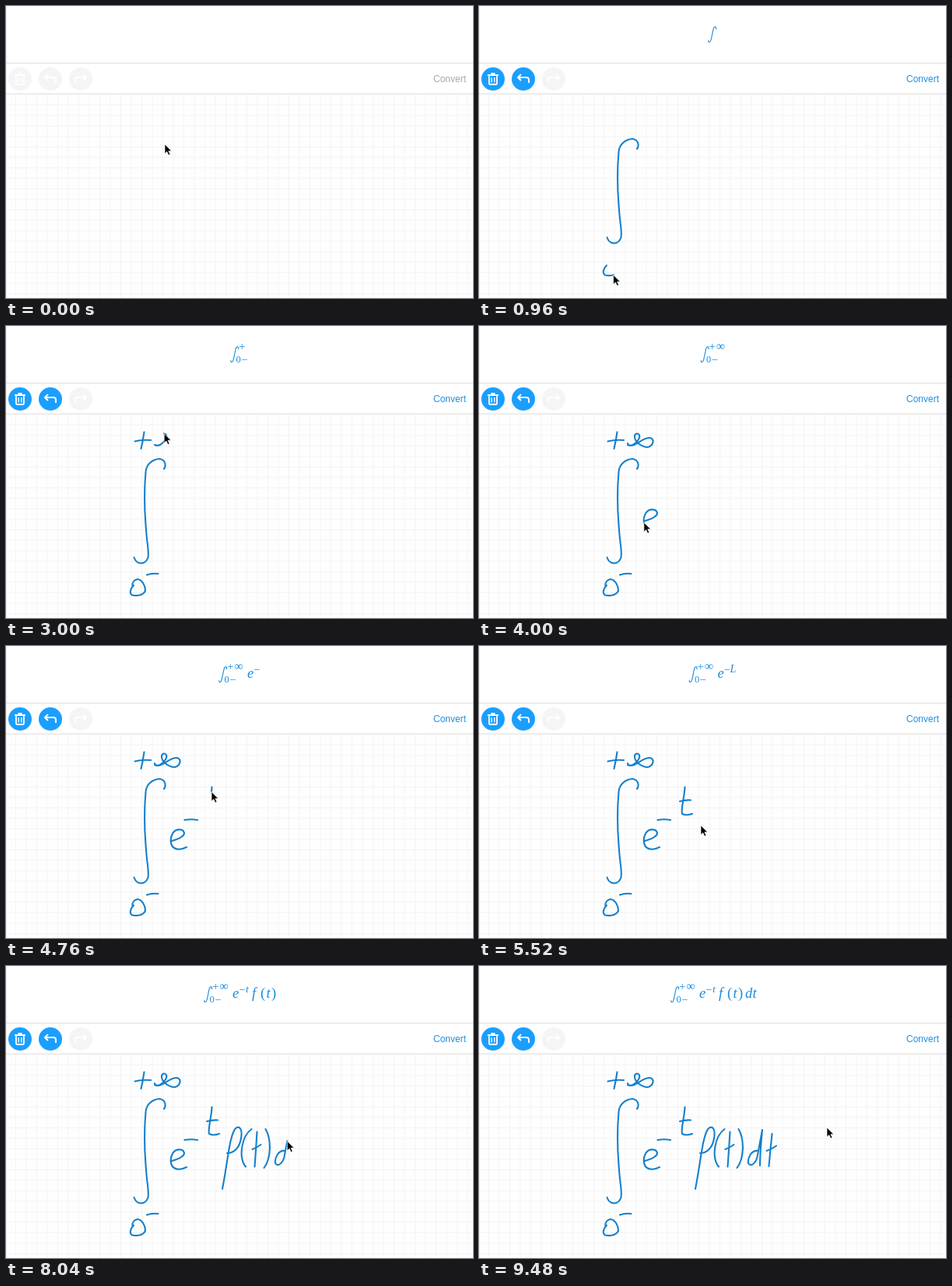
Animation of 600x376 px, one loop 9520 ms. Source, as an HTML page:

```html
<!DOCTYPE html>
<html lang="en">
<head>
<meta charset="utf-8">
<title>Handwritten math</title>
<style>
  html, body { margin: 0; width: 100%; height: 100%; overflow: hidden; background: #fff; }
  svg { display: block; width: 600px; height: 376px; }
  .convert { font: 12px "Liberation Sans", Arial, sans-serif; }
  #formula { fill: #1a8cdc; font-family: "Liberation Serif", "Times New Roman", serif; }
  #formula .it { font-style: italic; }
  #ink path { fill: none; stroke: #1580cd; stroke-width: 2.1; stroke-linecap: round; stroke-linejoin: round; }
  .icon { fill: none; stroke: #fff; stroke-width: 2; stroke-linejoin: round; }
</style>
</head>
<body>
<svg viewBox="0 0 600 376">
  <defs>
    <pattern id="grid" x="12" y="113.5" width="13.5" height="13.5" patternUnits="userSpaceOnUse">
      <path d="M.5 0V13.5M0 .5H13.5" stroke="#f4f4f4" fill="none"/>
    </pattern>
    <g id="trash" class="icon">
      <path d="M-5-4.5V5.5Q-5 7-3.5 7H3.5Q5 7 5 5.5V-4.5" stroke-width="1.8"/>
      <path d="M-7-5H7M-2.5-7H2.5" stroke-width="1.8"/>
      <path d="M-1.8-2V4.5M1.8-2V4.5" stroke-width="1.4"/>
    </g>
    <g id="arrow" class="icon">
      <path d="M-3-6L-7-2L-3 2M-7-2H4Q7-2 7 1V5"/>
    </g>
  </defs>

  <rect width="600" height="376" fill="#fff"/>
  <rect y="114" width="600" height="262" fill="#fefefe"/>
  <rect y="114" width="600" height="262" fill="url(#grid)"/>
  <path d="M.5 0V376" stroke="#ececec"/>
  <path d="M0 73.5H600M0 113H600" stroke="#dcdcdc"/>

  <g fill="#f5f4f6">
    <circle cx="18" cy="94" r="15"/>
    <circle cx="57" cy="94" r="15"/>
    <circle cx="96" cy="94" r="15"/>
  </g>
  <g id="active" fill="#1a9fff">
    <circle cx="18" cy="94" r="15"/>
    <circle cx="57" cy="94" r="15"/>
    <text class="convert" x="549" y="97.5" fill="#1a8fe0">Convert</text>
  </g>
  <text id="idle" class="convert" x="549" y="97.5" fill="#a8a8a8">Convert</text>
  <use href="#trash" x="18" y="94"/>
  <use href="#arrow" x="57" y="94"/>
  <use href="#arrow" transform="translate(96 94) scale(-1 1)"/>

  <g id="formula"></g>
  <g id="ink"></g>
  <path id="cursor" d="M0 0V12.2L2.8 9.6L4.8 14L6.9 13.1L4.9 8.8H8.8Z" fill="#000" stroke="#fff" stroke-width=".7"/>
</svg>

<script>
const LOOP = 9520;
const byId = id => document.getElementById(id);
const make = (parent, tag, attrs) => {
  const el = document.createElementNS('http://www.w3.org/2000/svg', tag);
  for (const key in attrs) el.setAttribute(key, attrs[key]);
  return parent.appendChild(el);
};
const clamp = v => Math.max(0, Math.min(1, v));
const smooth = v => v * v * (3 - 2 * v);

// Pen strokes: start ms, end ms, path
const strokes = [
  [30, 600, 'M203 184C206 180 205 172 197 171C187 172 180 179 179.5 188C177 215 178 240 180 262C181 280 184 290 182.5 298C179 308 168 308 164.5 298'],
  [780, 1250, 'M164 334C160 338 158 344 162 346.5C168 348 176 347 179 341C179 334 175 327 169 326C164 327 162 331 162.5 335'],
  [1500, 1640, 'M181 320.5Q187 318 195.5 319'],
  [2040, 2240, 'M165.500 148.500Q175 146 186 147'],
  [2400, 2590, 'M177.500 136.500Q176 148 173.500 158'],
  [2850, 3450, 'M191 153C196 156 202 151 205 146C209 139 202 136 200 141C199 149 209 156 217 156C224 154 226 146 220 144C211 143 204 153 196 154Q191 154 191 151'],
  [3720, 4140, 'M213 251C220 249 229 246 229 241C228 235 219 235 215 240C210 247 211 257 216 260C221 263 228 261 232 259'],
  [4380, 4530, 'M229.500 224Q238 222.500 246 224'],
  [4720, 5040, 'M264.500 181.500C264 195 259 211 261 216Q266 219 274 216'],
  [5210, 5340, 'M258 200Q265 198 272 198.500'],
  [5600, 6150, 'M284 241C293 241 300 234 302 222C304 210 300 205 295 209C287 218 285 252 278 287'],
  [6360, 6620, 'M315.500 210C303 219 298 246 308 258.500'],
  [6810, 7000, 'M322.500 213.500Q321 238 319.500 258.500'],
  [7110, 7230, 'M316.500 236Q322 234 327.500 230'],
  [7400, 7620, 'M333.500 210C341 223 341 247 331.500 260'],
  [7760, 8320, 'M358 238C350 237 345 247 346 254C350 260 357 252 358 243L364 211Q361 240 361 257'],
  [8500, 8700, 'M376.500 216Q374 240 372.500 258'],
  [8850, 8960, 'M369.500 238Q376 236 382 231.500'],
].map(([start, end, d]) => {
  const el = make(byId('ink'), 'path', { d });
  return { start, end, el, length: el.getTotalLength() };
});

// Resting points of the pointer between strokes: ms, x, y
const rests = [[0, 204, 178], [2000, 169, 146], [5520, 285, 231], [6760, 322, 225], [9480, 447, 208]];
const stops = rests.map(([t, x, y]) => ({ t, x, y }));
for (const s of strokes) {
  const a = s.el.getPointAtLength(0), b = s.el.getPointAtLength(s.length);
  stops.push({ t: s.start, x: a.x, y: a.y }, { t: s.end, x: b.x, y: b.y });
}
stops.sort((a, b) => a.t - b.t);

// Typeset glyphs: shown from ms, x, baseline, size, text, style, hidden at ms
const sign = '\u2212';
const glyphs = [
  [1420, 7.5, 47, 12.5, '0'],
  [1840, 14, 47.5, 15, sign],
  [2700, 11, 31, 15, '+'],
  [3620, 20.5, 31, 15.5, '\u221e'],
  [4450, 37, 41, 18.5, 'e', 'it'],
  [4740, 45, 35, 14.5, sign],
  [5200, 53, 34, 14, 'L', 'it', 5640],
  [5640, 54, 34, 13.5, 't', 'it'],
  [6420, 62, 41, 18.5, 'f', 'it'],
  [6960, 73, 41, 18.5, '('],
  [7360, 80.5, 41, 18.5, 't', 'it'],
  [7780, 87, 41, 18.5, ')'],
  [8540, 96, 41, 18.5, 'd', 'it'],
  [9120, 105.5, 41, 18.5, 't', 'it'],
].map(([from, x, y, size, text, style = '', until = LOOP]) => {
  const el = make(byId('formula'), 'text', { x, y, 'font-size': size, class: style });
  el.textContent = text;
  return { from, until, el };
});
glyphs.push({
  from: 700, until: LOOP,
  el: make(byId('formula'), 'path', {
    d: 'M10.500 29.500C11 26 8 25.500 7 30L4.500 42C3.500 47.500 .5 47.500 .8 44.500',
    fill: 'none', stroke: '#1a8cdc', 'stroke-width': 1.15, 'stroke-linecap': 'round'
  })
});

// The formula stays centred as it grows: ms, left edge
const lefts = [[0, 294], [1420, 292], [1840, 289], [2700, 288], [3620, 284.5], [4450, 277.5], [4740, 273],
  [5200, 269.5], [5640, 269.5], [6420, 266], [6960, 260.5], [7360, 257.5], [7780, 254], [8540, 249], [9120, 246]];

function pointerAt(t) {
  const s = strokes.find(s => t >= s.start && t <= s.end);
  if (s) return s.el.getPointAtLength(s.length * (t - s.start) / (s.end - s.start));
  const i = stops.findIndex(p => p.t > t);
  if (i < 0) return stops[stops.length - 1];
  const a = stops[i - 1], b = stops[i];
  const p = smooth((t - a.t) / (b.t - a.t));
  return { x: a.x + (b.x - a.x) * p, y: a.y + (b.y - a.y) * p };
}

function draw(t) {
  for (const { start, end, el, length } of strokes) {
    const p = clamp((t - start) / (end - start));
    el.style.display = p ? '' : 'none';
    el.style.strokeDasharray = p < 1 ? `${length * p} ${length + 9}` : 'none';
  }
  for (const { from, until, el } of glyphs) el.style.display = t >= from && t < until ? '' : 'none';
  const left = lefts.filter(([from]) => t >= from).pop()[1];
  byId('formula').setAttribute('transform', `translate(${left} 0)`);

  const enabled = clamp((t - 620) / 200);
  byId('active').style.opacity = enabled;
  byId('idle').style.opacity = 1 - enabled;

  const { x, y } = pointerAt(t);
  byId('cursor').setAttribute('transform', `translate(${x} ${y})`);
}

const began = performance.now();
function tick() {
  draw((performance.now() - began) % LOOP);
  requestAnimationFrame(tick);
}
tick();
</script>
</body>
</html>
```
